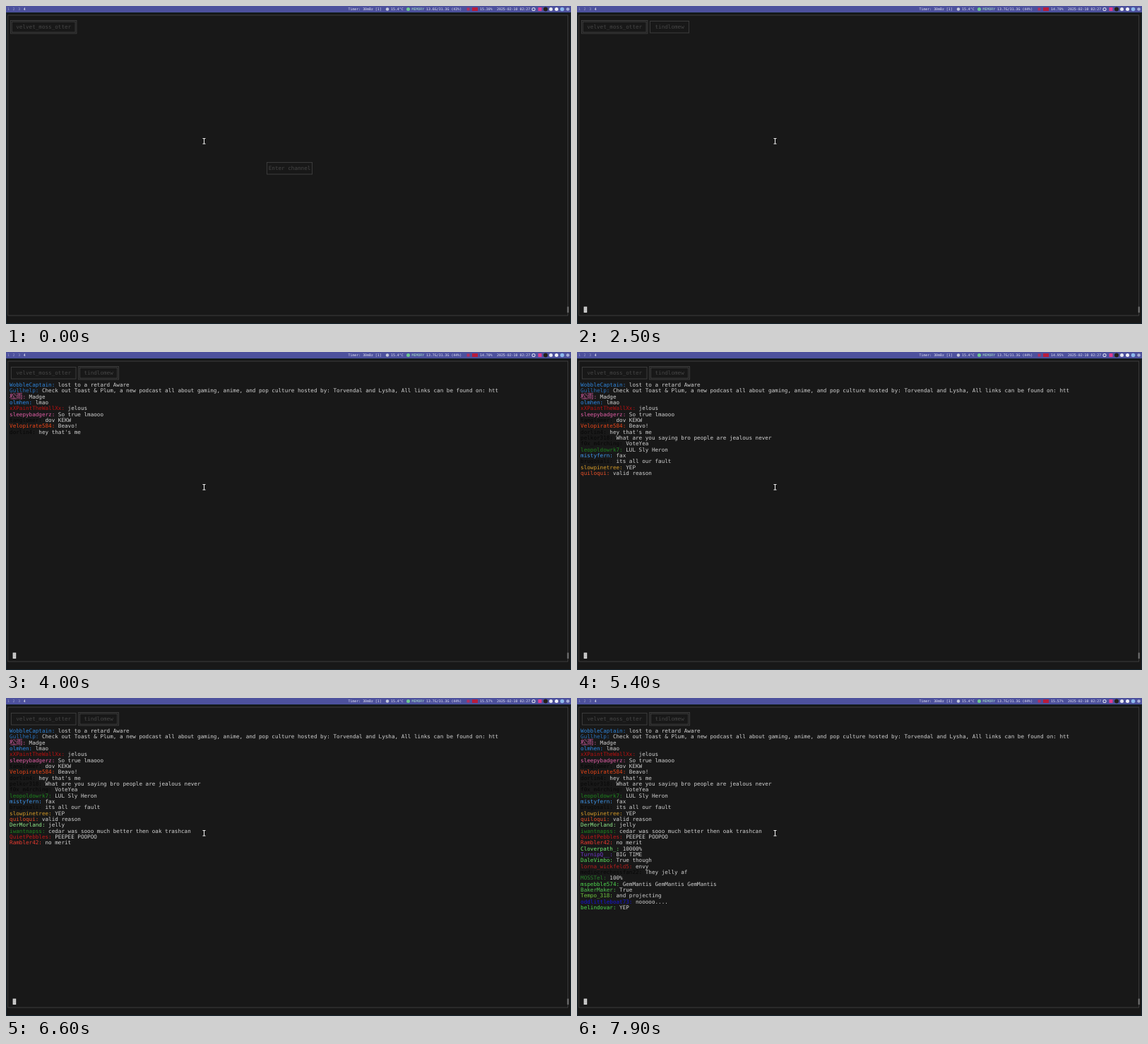
An HTML page with a canvas for the animation above (8 s loop, 800 by 450 pixels).

```html
<!DOCTYPE html>
<html lang="en">
<head>
<meta charset="utf-8">
<title>Terminal chat</title>
<style>
html, body { margin: 0; width: 100%; height: 100%; overflow: hidden; background: #181818; }
canvas { display: block; }
</style>
</head>
<body>
<canvas width="800" height="450"></canvas>
<script>
const ctx = document.querySelector('canvas').getContext('2d');
const LOOP = 8000, CELL = 11 / 2.4, ROW = 20 / 2.4;
const FONT = '"DejaVu Sans Mono", "Noto Sans Mono", "Noto Sans CJK JP", monospace';
const DIM = '#464646', LINE = '#424242', BLACK = '#070707';
const CHANNELS = ['velvet_moss_otter', 'tindlomew'];

// time of arrival, name, name colour, message
const chat = [
  [3400, 'WobbleCaptain', '#2f86dc', 'lost to a retard Aware'],
  [3450, 'Gullhelp', '#2870ba', 'Check out Toast & Plum, a new podcast all about gaming, anime, and pop culture hosted by: Torvendal and Lysha, All links can be found on: htt'],
  [3500, '松雨', '#d65fa6', 'Madge'],
  [3600, 'olmhen', '#2f8cec', 'lmao'],
  [3700, 'xXPaintTheWallXx', '#b81010', 'jelous'],
  [3750, 'sleepybadgerz', '#e45fa8', 'So true lmaooo'],
  [3800, 'tanglomer', BLACK, 'dov KEKW'],
  [3900, 'Velopirate584', '#ee4618', 'Beavo!'],
  [4000, 'dorlin4', BLACK, "hey that's me"],
  [4050, 'pelkor318', BLACK, 'What are you saying bro people are jealous never'],
  [4100, 'f0x_m4rching', BLACK, 'VoteYea'],
  [4150, 'leopoldowrk7', '#1e861e', 'LUL Sly Heron'],
  [4200, 'mistyfern', '#3f98ee', 'fax'],
  [4500, 'brugosali', BLACK, 'its all our fault'],
  [4950, 'slowpinetree', '#d69c28', 'YEP'],
  [5400, 'quiloqui', '#e85028', 'valid reason'],
  [5700, 'DerMorland', '#94ee8c', 'jelly'],
  [6100, 'iwantnapss', '#1e861e', 'cedar was sooo much better then oak trashcan'],
  [6300, 'QuietPebbles', '#c41818', 'PEEPEE POOPOO'],
  [6500, 'Rambler42', '#e83a30', 'no merit'],
  [6650, 'Cloverpath_', '#74ee74', '10000%'],
  [6850, 'TurnipQ__', '#743cd4', 'BIG TIME'],
  [7000, 'DaleVimbo', '#5ae05a', 'True though'],
  [7300, 'lorna_wickfeld5', '#b81c1c', 'envy'],
  [7400, 'mediocrechessfan22', BLACK, 'They jelly af'],
  [7400, 'MOSSTel', '#28802a', '100%'],
  [7500, 'mspebble574', '#50d850', 'GemMantis GemMantis GemMantis'],
  [7600, 'BakerMaker', '#50c850', 'True'],
  [7700, 'Tempo_318', '#70c840', 'and projecting'],
  [7700, 'oddlittleboat73', '#1616d8', 'nooooo....'],
  [7800, 'belindovar', '#50e050', 'YEP']
];
const keys = [550, 750, 900, 1050, 1300, 1450, 1600, 2000, 2200];
const cpu = [[0, '15.30%'], [100, '14.87%'], [2000, '14.70%'], [4850, '14.95%'], [6100, '15.57%']];

// Centre of a terminal cell.
const colX = col => 2.75 + col * CELL;
const rowY = row => 13 + row * ROW;

// Draws in equal steps and returns the x after the text.
function text(s, x, y, color, cell = CELL) {
  ctx.fillStyle = color;
  for (const c of s) {
    const wide = c > '\u2e80';
    ctx.font = (wide ? cell * 2 : cell / 0.602) + 'px ' + FONT;
    ctx.fillText(c, x, y + cell * (wide ? 0.68 : 0.57));
    x += wide ? cell * 2 : cell;
  }
  return x;
}
const print = (s, col, row, color) => text(s, colX(col - 0.5), rowY(row), color);

function fill(x, y, w, h, color) {
  ctx.fillStyle = color;
  ctx.fillRect(x, y, w, h);
}
function frame(x, y, w, h, color = LINE) {
  ctx.strokeStyle = color;
  ctx.lineWidth = 0.85;
  ctx.strokeRect(x, y, w, h);
}
function box(col, row, cols, rows, grow = 0) {
  frame(colX(col) - grow, rowY(row) - grow, cols * CELL + 2 * grow, rows * ROW + 2 * grow);
}
function dot(x, y, r, color) {
  ctx.fillStyle = color;
  ctx.beginPath();
  ctx.arc(x, y, r, 0, 7);
  ctx.fill();
}

function statusBar(t) {
  const put = (s, x, color = '#e4e4f2') => text(s, x, 4.4, color, 2.95);
  fill(0, 0, 800, 9, '#4d519d');
  ['1', '2', '3', '4'].forEach((n, i) => put(n, 2 + i * 7.6, i == 3 ? '#fff' : '#9ca0cc'));
  put('Timer: 30mBz [1]', 484.5);
  dot(540, 4.5, 2.2, '#c4c8dc');
  put('15.4°C', 545);
  dot(569.5, 4.5, 2.5, '#6cc890');
  put('MEMORY', 574.5, '#a8e4c8');
  put(t < 550 ? '13.6G/31.3G (43%)' : '13.7G/31.3G (44%)', 595);
  fill(652.5, 2.5, 4, 4, '#b03060');
  fill(660, 2, 8, 5, '#b81c3c');
  put(cpu.findLast(c => t >= c[0])[1], 671);
  put('2025-02-10 02:27', 695);
  dot(747, 4.5, 2.6, '#d8daea');
  dot(747, 4.5, 1.5, '#4d519d');
  fill(753.5, 2, 5, 5, '#e03c90');
  dot(764, 4.5, 3, '#242018');
  dot(771.5, 4.5, 2.5, '#e6e8f2');
  dot(779.5, 4.5, 2.5, '#f0f0f8');
  dot(787.5, 4.5, 2.8, '#8cb8ec');
  dot(795.5, 4.5, 2.3, '#a8b0d8');
}

function tab(name, col, active) {
  const cols = name.length + 3;
  if (active) {
    box(col, 1, cols, 2, 0.9);
    box(col, 1, cols, 2, -0.9);
  } else {
    box(col, 1, cols, 2);
  }
  print(name, col + 2, 2, DIM);
}

function popup(t) {
  box(80, 25, 14, 2);
  const typed = keys.filter(k => t >= k).length;
  if (typed) print(CHANNELS[1].slice(0, typed), 81, 26, '#bbb');
  else print('Enter channel', 81, 26, DIM);
}

function pointer(x, y) {
  fill(x, y - 4, 1, 8, '#eee');
  fill(x - 1.5, y - 4, 4, 1, '#eee');
  fill(x - 1.5, y + 3.5, 4, 1, '#eee');
}

function draw(t) {
  fill(0, 0, 800, 450, '#181818');
  fill(0, 9, 800, 2, '#111315');
  frame(0.5, 9.5, 799, 440, '#1b2a36');
  box(0, 0, 173, 51);
  statusBar(t);

  const joined = t >= 2500, switched = t >= 3400;
  tab(CHANNELS[0], 1, !switched);
  if (joined) {
    tab(CHANNELS[1], 22, switched);
    fill(colX(1.5), rowY(49.5), CELL, ROW, '#e0e0e0');
    frame(colX(1.5) + 1.4, rowY(49.5) + 1.5, 1.8, 5, '#aaa');
  } else {
    popup(t);
  }
  fill(colX(173) - 1, rowY(49.5), 2, ROW, '#777');

  chat.forEach(([at, name, color, message], i) => {
    if (t < at) return;
    const x = print(name + ': ', 1, i + 4, color);
    text(message, x, rowY(i + 4), '#d2d2d2');
  });
  pointer(280, 191);
}

function tick() {
  draw(performance.now() % LOOP);
  requestAnimationFrame(tick);
}
tick();
</script>
</body>
</html>
```
